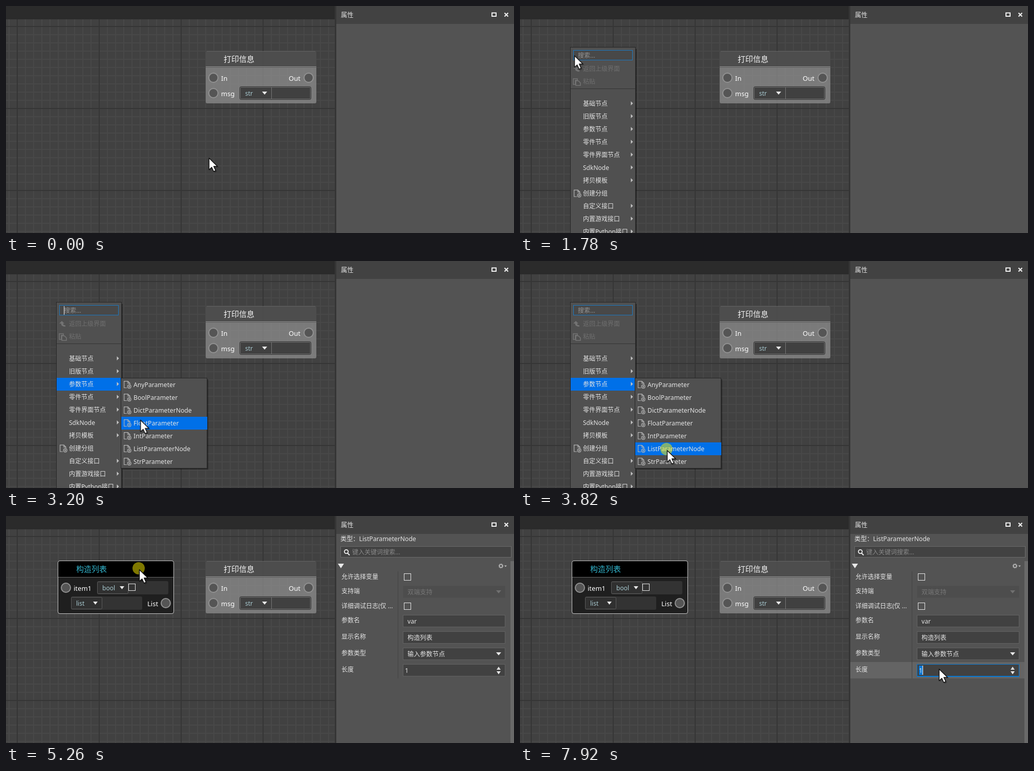
Write an HTML page that moves like this. It is 992 px wide and 443 px high and loops after 8 s.

```html
<!DOCTYPE html>
<html lang="zh-CN">
<head>
<meta charset="utf-8">
<title>节点编辑器</title>
<style>
html, body { margin: 0; width: 100%; height: 100%; overflow: hidden; background: #414141; }
svg { display: block; width: 992px; height: 443px; }
text { font: 12.2px "Noto Sans", "Noto Sans CJK SC", "Noto Sans CJK", sans-serif; fill: #e4e4e4; white-space: pre; }
.port-label { font-size: 13px; fill: #fff; }
.title { font-size: 15px; fill: #f4f4f4; }
.value { font-size: 12px; fill: #a9cbd2; }

.anim { animation: 8s infinite step-end; }
#menu { animation-name: menu; }
#submenu { animation-name: submenu; }
#menu-hover { animation-name: menu-hover; }
#sub-hover { animation-name: sub-hover; }
#menu-caret { animation-name: menu-caret; }
#panel, #list-node { animation-name: created; }
#row-focus, #field-focus { animation-name: focus; }
#field-caret { animation-name: field-caret; }
#press { animation-name: press; }
#drag { animation: drag 8s infinite ease-in-out; }
#cursor { animation: cursor 8s infinite ease-in-out; }

@keyframes menu { 0% { opacity: 0 } 13% { opacity: 1 } 48.9%, 100% { opacity: 0 } }
@keyframes submenu { 0% { opacity: 0 } 30.7% { opacity: 1 } 48.9%, 100% { opacity: 0 } }
@keyframes created { 0% { opacity: 0 } 51.3%, 100% { opacity: 1 } }
@keyframes focus { 0% { opacity: 0 } 85.3%, 100% { opacity: 1 } }
@keyframes menu-caret {
  0%, 26.3%, 39% { opacity: 1 }
  19.6%, 33.2%, 45.2%, 100% { opacity: 0 }
}
@keyframes field-caret { 0% { opacity: 0 } 85.3%, 98.05%, 100% { opacity: 1 } 91.7% { opacity: 0 } }
@keyframes press {
  0%, 11.95%, 48.6%, 67.3%, 87%, 100% { opacity: 0 }
  10.3%, 46.9%, 60%, 85.3% { opacity: .5 }
}
@keyframes menu-hover {
  0% { opacity: 0; transform: translateY(0) }
  25.2% { opacity: 1; transform: translateY(0) }
  25.9% { opacity: 1; transform: translateY(25px) }
  27%, 100% { opacity: 1; transform: translateY(50px) }
}
@keyframes sub-hover {
  0% { opacity: 0; transform: translateY(0) }
  35.7% { opacity: 1; transform: translateY(0) }
  38% { opacity: 1; transform: translateY(25px) }
  39% { opacity: 1; transform: translateY(50px) }
  39.9% { opacity: 1; transform: translateY(75px) }
  40.6% { opacity: 1; transform: translateY(100px) }
  42.4%, 100% { opacity: 1; transform: translateY(125px) }
}
@keyframes drag {
  0%, 60.3% { transform: translateY(-48px) }
  64.5%, 100% { transform: translateY(0) }
}
@keyframes cursor {
  0% { transform: translate(396px, 296px) }
  9.5%, 20.5% { transform: translate(98.5px, 82px) }
  29%, 33% { transform: translate(183px, 244px) }
  37% { transform: translate(236px, 248px) }
  42.5% { transform: translate(281px, 354px) }
  46%, 51.5% { transform: translate(287px, 369px) }
  59%, 60.3% { transform: translate(260px, 56px) }
  64.5%, 67.2% { transform: translate(260px, 104px) }
  73.4% { transform: translate(892px, 257px) }
  79.5%, 82% { transform: translate(808px, 294px) }
  83%, 87% { transform: translate(805px, 303px) }
  94.9%, 97.5% { transform: translate(820px, 301px) }
  98.9%, 100% { transform: translate(818px, 298px) }
}
</style>
</head>
<body>
<svg id="stage" viewBox="0 0 992 443">
  <defs>
    <pattern id="minor" x="5" y="39" width="16" height="16" patternUnits="userSpaceOnUse">
      <path d="M0 1H16M1 0V16" stroke="#484848" stroke-width="2"/>
    </pattern>
    <pattern id="major" x="21" y="39" width="160" height="160" patternUnits="userSpaceOnUse">
      <path d="M0 1H160M1 0V160" stroke="#353535" stroke-width="2"/>
    </pattern>
    <g id="page" fill="none" stroke="#b4b4b4" stroke-width="1.2">
      <path d="M6 13.5H.6V.6H8L12 4.6V7M8 .6V4.6H12"/>
      <circle cx="10.7" cy="11" r="3.4"/>
      <path d="M8.7 11H12.7M10.7 9V13"/>
    </g>
  </defs>
</svg>
<script>
const rect = (x, y, w, h, fill, extra = "") =>
  `<rect x="${x}" y="${y}" width="${w}" height="${h}" fill="${fill}" ${extra}/>`;
const box = (x, y, w, h, fill, stroke, r = 0) =>
  rect(x + .5, y + .5, w - 1, h - 1, fill, `stroke="${stroke}" rx="${r}"`);
const text = (x, y, str, attrs = "") => `<text x="${x}" y="${y}" ${attrs}>${str}</text>`;
const path = (d, fill = "#ddd", extra = "") => `<path d="${d}" fill="${fill}" ${extra}/>`;
const line = (d, stroke, w = 1) => path(d, "none", `stroke="${stroke}" stroke-width="${w}"`);
const down = (x, y, w, h, fill = "#e8e8e8") => path(`M${x} ${y}h${w}l${-w / 2} ${h}z`, fill);
const port = (x, y) =>
  `<circle cx="${x}" cy="${y}" r="9" fill="#555" stroke="#929292" stroke-width="2"/>`;
const label = (x, y, str) => text(x, y, str, 'class="port-label"');
const check = (x, y) => box(x, y, 14, 14, "none", "#e8e8e8");
const group = (id, body, cls = "anim") => `<g id="${id}" class="${cls}">${body}</g>`;

const canvasArea = rect(0, 0, 642, 443, "#414141") + rect(0, 26, 642, 417, "url(#minor)") +
  rect(0, 26, 642, 417, "url(#major)") + rect(0, 0, 642, 26, "#2b2b2b");

const panelFrame = rect(642, 0, 3, 443, "#353535") + rect(645, 0, 347, 443, "#535353") +
  rect(645, 0, 347, 35, "#424242") + text(654, 22, "属性") +
  rect(949, 13.5, 8, 6.5, "none", 'stroke="#f0f0f0" stroke-width="2"') +
  line("M973.5 13.5l7 7m0-7l-7 7", "#f0f0f0", 2.2);

const printNode =
  path("M390 119V91q0-3 3-3H603q3 0 3 3V119z", "#4e4e4e", 'fill-opacity=".93"') +
  path("M390 119H606V187q0 3-3 3H393q-3 0-3-3z", "#8e8e8e", 'fill-opacity=".75"') +
  line("M392 88.5H604", "#626262") + line("M390 118.5H606", "#999") + line("M390 119.5H606", "#505050") +
  text(425, 109, "打印信息", 'class="title"') +
  port(405, 140) + port(405, 170) + port(591, 140) +
  label(420, 146, "In") + label(552, 146, "Out") + label(420, 176, "msg") +
  box(456, 157, 140, 26, "#404040", "#2c2c2c", 3) +
  box(457, 158, 138, 24, "none", "#777", 2) + line("M518.5 158V182", "#777") +
  text(467, 175, "str", 'class="value"') + down(500, 167, 10, 6);

const combo = (x, y, str, arrow) =>
  rect(x, y, 139, 26, "#333", 'rx="3"') + box(x, y + 1, 61, 24, "#303030", "#5c5c5c", 2) +
  text(x + 10, y + 17.5, str, 'class="value"') + down(arrow, y + 10, 9, 6);

const listNode = rect(102, 88, 225, 102, "#1f1f1f", 'rx="3"') +
  path("M102 119V91q0-3 3-3H324q3 0 3 3V119z", "#000") + line("M102 119.5H327", "#686868") +
  box(101, 87, 227, 104, "none", "#c8c8c8", 3.5) +
  text(137, 109, "构造列表", 'class="title" style="fill:#32b4cc"') +
  port(117, 140) + port(312, 170) + label(132, 146, "item1") + label(276, 176, "List") +
  combo(178, 127, "bool", 222) + check(239, 132) + combo(127, 157, "list", 170);

const labels = [["允许选择变量", 123], ["支持端", 151], ["详细调试日志(仅 ...", 180],
  ["参数名", 208], ["显示名称", 240], ["参数类型", 272], ["长度", 304]];
const field = (y, str, x = 784) => box(775, y, 200, 24, "#414141", "#626262") + text(x, y + 17, str);

const panel = text(653, 49, "类型：ListParameterNode") +
  box(653, 59, 334, 22, "#424242", "#6a6a6a") +
  `<circle cx="664.5" cy="69.5" r="3.7" fill="none" stroke="#eee" stroke-width="1.8"/>` +
  line("M667 72.5l4 4", "#eee", 2) +
  text(676, 75, "键入关键词搜索...", 'style="fill:#8a8a8a;font-size:12px"') +
  down(648, 93, 12, 9) +
  `<circle cx="966.5" cy="97.5" r="3" fill="none" stroke="#bbb" stroke-width="1.6"/>
   <circle cx="966.5" cy="97.5" r="4.3" fill="none" stroke="#bbb" stroke-dasharray="1.7 1.68"/>` +
  down(973, 96.5, 5, 3, "#bbb") + rect(985, 88, 7, 355, "#696969") +
  group("row-focus", rect(645, 285, 340, 32, "#646464")) +
  line("M765.5 108V317", "#444") +
  labels.map(([str, y]) => text(655, y, str, 'style="font-size:12px"')).join("") +
  check(777, 112) + check(777, 169) +
  box(775, 136, 200, 24, "#4d4d4d", "#505050") + text(784, 153, "双端支持", 'style="fill:#777"') +
  down(957, 145, 10, 6, "#707070") +
  field(193, "var") + field(225, "构造列表") + field(257, "输入参数节点") + down(957, 266, 10, 6) +
  field(289, "") +
  group("field-focus", box(775, 289, 200, 24, "none", "#0878d2") +
    rect(775, 312, 200, 2, "#0878d2") + rect(779, 292, 7, 18, "#0878d7")) +
  text(779, 306, "1") + path("M958 300h8l-4-6z") + down(958, 303, 8, 6) +
  group("field-caret", rect(786, 292, 1, 18, "#fff"));

const items = ["基础节点", "旧版节点", "参数节点", "零件节点", "零件界面节点", "SdkNode",
  "拷贝模板", "创建分组", "自定义接口", "内置游戏接口", "内置Python接口"];
const menuRow = (str, i) => {
  const y = 190 + 25 * i;
  return text(123, y + 4.5, str, 'style="font-size:12px"') + (str === "创建分组"
    ? `<use href="#page" x="105" y="${y - 32 + 25.5}"/>`
    : path(`M216.5 ${y - 4}v8l4-4z`, "#c4c4c4"));
};
const disabled = 'style="fill:#6f6f6f;font-size:12px"';
const menu = rect(101, 84, 127, 359, "#000", 'opacity=".35"') +
  box(98, 80, 128, 370, "#505050", "#262626") +
  box(104, 86, 116, 20, "#484848", "#1a78c2") +
  text(113, 101, "搜索...", 'style="fill:#959595;font-size:12px"') +
  group("menu-caret", rect(113, 88, 1, 17, "#e8e8e8")) +
  path("M109 117l-5 5h3.5q0 6 8.500 6v-2.500q-4.500 0-4.500-3.500H114z", "#747474") +
  text(123, 127, "返回上级界面", disabled) +
  path("M104 142h8v3h-4v8h-4zM109 146h5l4 4v5h-9z", "none", 'stroke="#747474" stroke-width="1.6"') +
  text(123, 152, "粘贴", disabled) + line("M99 161.5H225", "#343434") +
  group("menu-hover", rect(99, 178, 126, 25, "#0070e8")) +
  items.map(menuRow).join("");

const types = ["AnyParameter", "BoolParameter", "DictParameterNode", "FloatParameter",
  "IntParameter", "ListParameterNode", "StrParameter"];
const submenu = rect(228, 231, 167, 176, "#000", 'opacity=".35"') +
  box(224, 228, 169, 177, "#505050", "#262626") +
  group("sub-hover", rect(225, 229, 168, 25, "#0070e8")) +
  types.map((str, i) => `<use href="#page" x="230" y="${234 + 25 * i}"/>` +
    text(249, 246 + 25 * i, str)).join("");

const cursor = `<circle id="press" class="anim" cx="-1" cy="-2" r="12" fill="#fff000"/>` +
  path("M2 3V26l5.500-5 4 8.500 4.500-2-4-8.500H20z", "#000", 'opacity=".22"') +
  path("M.5.8V23.500l5.200-4.800 3.800 8.300 4-1.800-3.800-8.200h7.300z", "#fff",
    'stroke="#111" stroke-width="1.500" stroke-linejoin="round"');

document.getElementById("stage").insertAdjacentHTML("beforeend",
  canvasArea + printNode + group("list-node", group("drag", listNode, "")) + panelFrame +
  group("panel", panel) + group("menu", menu) + group("submenu", submenu) +
  group("cursor", cursor, ""));
</script>
</body>
</html>
```
